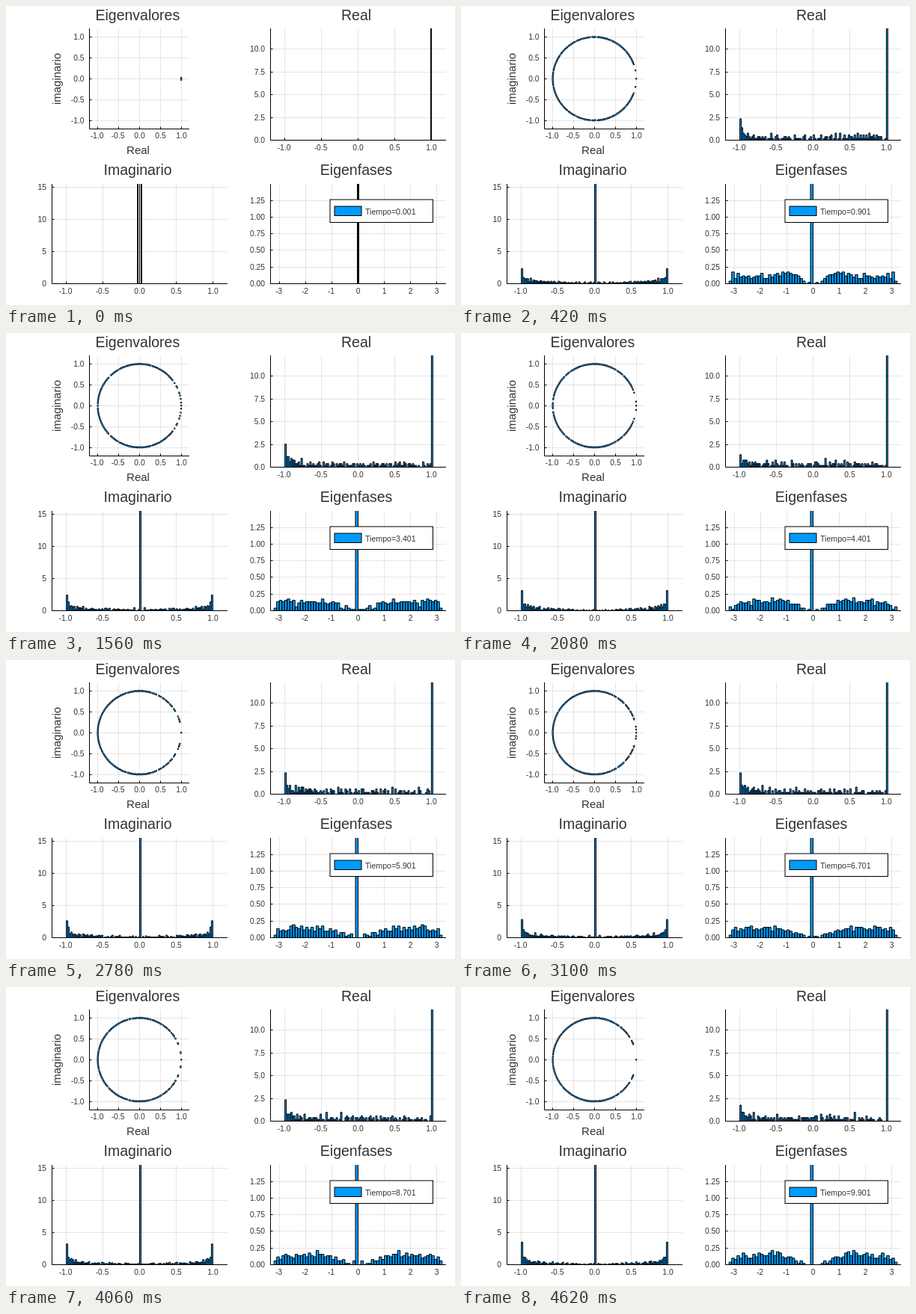
Write an HTML page that moves like this. It is 600 by 400 pixels and loops after 4640 ms.

```html
<!DOCTYPE html>
<html lang="es">
<head>
<meta charset="utf-8">
<title>Eigenvalores</title>
<style>
  html, body { margin: 0; width: 100%; height: 100%; overflow: hidden; background: #fff; }
  svg { display: block; width: 600px; height: 400px; }
  text { font-family: "Liberation Sans", Arial, sans-serif; font-size: 10.3px; fill: #333; }
  .title { font-size: 19.5px; }
  .label { font-size: 15px; }
  .legend { font-size: 10.6px; }
  .grid { stroke: #000; stroke-opacity: .1; fill: none; }
  .axis { stroke: #000; fill: none; }
  .bars, .swatch { fill: #009afa; stroke: #000; }
  .dots { fill: none; stroke: #000; stroke-width: 2.5; stroke-linecap: round; }
  .core { fill: none; stroke: #009afa; stroke-width: 1.1; stroke-linecap: round; }
</style>
</head>
<body>
<svg id="stage" viewBox="0 0 600 400"></svg>
<script>
const stage = document.getElementById('stage');

function add(tag, attrs, text) {
  const el = document.createElementNS('http://www.w3.org/2000/svg', tag);
  for (const k in attrs) el.setAttribute(k, attrs[k]);
  if (text !== undefined) el.textContent = text;
  stage.appendChild(el);
  return el;
}
const label = (x, y, text, cls = '', anchor = 'middle') =>
  add('text', { x, y, class: cls, 'text-anchor': anchor }, text);
const snap = v => Math.floor(v) + .5;

// x0, y0: pixel of the data zero; sx, sy: pixels per unit
const panels = [
  { title: 'Eigenvalores', box: [111.5, 30, 245, 164], x0: 178.4, y0: 97.3, sx: 55.8, sy: 55.8,
    xt: [-1, 1, .5, 1], yt: [-1, 1, .5, 1], titleY: 19 },
  { title: 'Real', box: [353, 30, 588, 179.5], x0: 470.5, y0: 179.5, sx: 97.9, sy: 12.2,
    xt: [-1, 1, .5, 1], yt: [0, 10, 2.5, 1], titleY: 19 },
  { title: 'Imaginario', box: [61, 238, 296, 371.5], x0: 178.5, y0: 371.5, sx: 97.9, sy: 8.6,
    xt: [-1, 1, .5, 1], yt: [0, 15, 5, 0], titleY: 226 },
  { title: 'Eigenfases', box: [353, 238, 588, 371.5], x0: 470.5, y0: 371.5, sx: 35.1, sy: 89.1,
    xt: [-3, 3, 1, 0], yt: [0, 1.25, .25, 2], titleY: 226 }
];

function ticks([from, to, step, digits]) {
  const out = [];
  for (let v = from; v <= to + 1e-9; v += step) out.push([v, v.toFixed(digits)]);
  return out;
}

function drawPanel(p, i) {
  const [l, t, r, b] = p.box, left = snap(l), base = snap(b);
  let grid = '', axis = `M${left} ${t}V${base}H${r}`;
  for (const [v, s] of ticks(p.xt)) {
    const x = snap(p.x0 + v * p.sx);
    grid += `M${x} ${t}V${b}`;
    axis += `M${x} ${base}v-3`;
    label(x - (v < 0 ? 1 : 0), b + 13, s);
  }
  for (const [v, s] of ticks(p.yt)) {
    const y = snap(p.y0 - v * p.sy);
    grid += `M${l} ${y}H${r}`;
    axis += `M${left} ${y}h3`;
    label(l - 7, y + 3.7, s, '', 'end');
  }
  add('path', { class: 'grid', d: grid });
  add('path', { class: 'axis', d: axis });
  label((l + r) / 2 - 2.4, p.titleY, p.title, 'title');
  const clip = add('clipPath', { id: 'clip' + i });
  clip.appendChild(add('rect', { x: l, y: t, width: r - l, height: b - t + 1 }));
  const layer = cls => add('path', { class: cls, 'clip-path': `url(#clip${i})` });
  if (i) p.bars = layer('bars');
  else { p.dots = layer('dots'); p.core = layer('core'); }
}
panels.forEach(drawPanel);

label(176.5, 197.5, 'Real', 'label');
label(0, 0, 'imaginario', 'label').setAttribute('transform', 'translate(72.5 97.5) rotate(-90)');
add('rect', { x: 433, y: 259, width: 137.5, height: 30.5, fill: '#fff', stroke: '#000' });
add('rect', { x: 439, y: 268, width: 36, height: 12.5, class: 'swatch' });
const clock = label(480, 279, '', 'legend', 'start');

// Spectrum: conjugate pairs plus a block of exact zeros
const SIZE = 512, PAIRS = 176, SPEED = 25, CELLS = 314;

// Phase density every 0.3 rad at a few times
const shapes = [
  [1.9, [0, .02, .14, .16, .16, .12, .10, .13, .10, .11, .14]],
  [3.4, [0, .04, .04, .14, .12, .12, .14, .13, .10, .18, .12]],
  [4.4, [0, .02, .08, .12, .17, .16, .11, .16, .11, .13, .06]],
  [5.9, [0, .03, .07, .10, .13, .15, .16, .12, .20, .12, .12]],
  [7.6, [.01, .03, .07, .08, .12, .14, .14, .13, .11, .14, .12]],
  [9.9, [0, .01, .05, .10, .14, .18, .14, .14, .11, .13, .09]]
];

let seed = 7;
const random = () => (seed = seed * 16807 % 2147483647) / 2147483647;
const levels = Array.from({ length: PAIRS }, () =>
  ({ shift: random() * 2 * Math.PI, rate: 3 + random() * 12 }));

function density(time) {
  let k = 0;
  while (k < shapes.length - 2 && time > shapes[k + 1][0]) k++;
  const [ta, a] = shapes[k], [tb, b] = shapes[k + 1];
  const w = Math.min(1, Math.max(0, (time - ta) / (tb - ta)));
  const knots = a.map((v, i) => v + (b[i] - v) * w);
  return angle => {
    const s = Math.min(angle / .3, 9.999), i = Math.floor(s);
    return knots[i] + (knots[i + 1] - knots[i]) * (s - i);
  };
}

function phases(time) {
  const f = density(time), sum = [0];
  for (let i = 0; i < CELLS; i++) sum.push(sum[i] + f((i + .5) / 100));
  return levels.map(({ shift, rate }, j) => {
    const u = (j + .5 + 1.7 * Math.sin(shift + rate * time)) / PAIRS;
    const goal = Math.min(.999, Math.max(.001, u)) * sum[CELLS];
    let c = 0;
    while (sum[c + 1] < goal) c++;
    const end = (c + (goal - sum[c]) / (sum[c + 1] - sum[c])) / 100;
    return end * (1 - Math.exp(-SPEED * time / end));
  });
}

function niceStep(raw) {
  const unit = 10 ** Math.floor(Math.log10(raw)), r = raw / unit;
  return unit * (r <= 1.1 ? 1 : r <= 2.2 ? 2 : r <= 5.5 ? 5 : 10);
}

// nudge decides which bin takes values on an edge
function drawBars(p, values, nudge) {
  const step = niceStep((Math.max(...values) - Math.min(...values)) / 100);
  const bins = new Map();
  for (const v of values) {
    const k = Math.floor(v / step + nudge);
    bins.set(k, (bins.get(k) || 0) + 1);
  }
  let d = '';
  for (const [k, n] of bins) {
    const h = Math.min(n / (SIZE * step) * p.sy, 170);
    const x = p.x0 + k * step * p.sx, w = step * p.sx;
    d += `M${x.toFixed(2)} ${p.y0}v${(-h).toFixed(2)}h${w.toFixed(2)}v${h.toFixed(2)}z`;
  }
  p.bars.setAttribute('d', d);
}

function drawDots(p, angles) {
  const d = angles.map(a => {
    const x = p.x0 + Math.cos(a) * p.sx, y = p.y0 - Math.sin(a) * p.sy;
    return `M${x.toFixed(2)} ${y.toFixed(2)}h0`;
  }).join('');
  p.dots.setAttribute('d', d);
  p.core.setAttribute('d', d);
}

function draw(step) {
  const time = step / 10 + .001;
  const half = phases(time);
  const all = [...half, ...half.map(a => -a), ...Array(SIZE - 2 * PAIRS).fill(0)];
  drawDots(panels[0], all.slice(0, 2 * PAIRS + 1));
  drawBars(panels[1], all.map(Math.cos), 1e-6);
  drawBars(panels[2], all.map(Math.sin), 1e-6);
  drawBars(panels[3], all, -1e-6);
  clock.textContent = 'Tiempo=' + time.toFixed(3);
}

// Steps last 20, 100 and 20 ms in turn
const LOOP = 4640, start = performance.now();
let shown = 0;
function tick() {
  const t = (performance.now() - start) % LOOP, r = t % 140;
  const step = 3 * Math.floor(t / 140) + (r < 20 ? 0 : r < 120 ? 1 : 2);
  if (step !== shown) draw(shown = step);
  requestAnimationFrame(tick);
}
draw(0);
requestAnimationFrame(tick);
</script>
</body>
</html>
```
